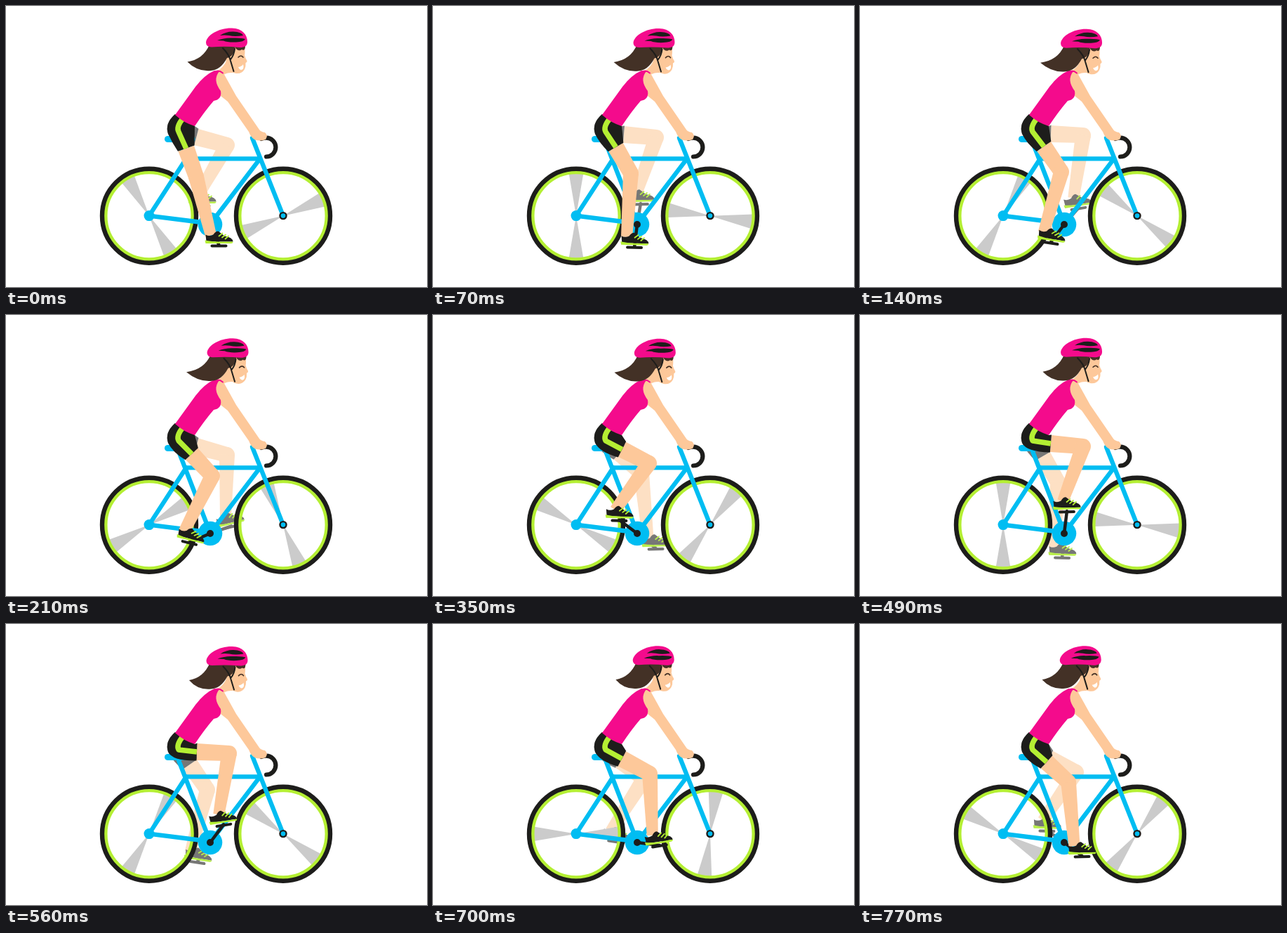
Write an HTML page with a canvas that moves like this. It is 600 px wide and 400 px high and loops after 840 ms.

```html
<!DOCTYPE html>
<html lang="en">
<head>
<meta charset="utf-8">
<title>Cyclist</title>
<style>
html, body { margin: 0; width: 100%; height: 100%; overflow: hidden; background: #fff; }
canvas { display: block; }
</style>
</head>
<body>
<canvas id="stage" width="600" height="400"></canvas>
<script>
const ctx = document.getElementById('stage').getContext('2d');
const STEP = 70, STEPS = 12, TURN = Math.PI / 6;
const BLUE = '#00bdf2', LIME = '#b4ef33', BLACK = '#1d1d1b', PINK = '#f40b8c',
      SKIN = '#fdc89a', HAIR = '#433126', GREY = '#cbcbcb';
const NEAR = { skin: SKIN, dark: BLACK, lime: LIME, shift: [0, 0] };
const FAR = { skin: '#fde0c4', dark: '#777776', lime: '#b9ee4c', shift: [1, 2] };
const HIP = [249, 181], CRANK = [291, 311];

// Knee position for each twelfth of a pedal turn
const KNEES = [
  [271, 243], [282, 238], [287, 236], [294, 229], [301, 220], [308, 211],
  [315, 198], [318, 187], [318, 184], [315, 199], [309, 213], [297, 225]
];

function fill(path, color) {
  ctx.fillStyle = color;
  ctx.fill(new Path2D(path));
}

function line(path, color, width, cap = 'round') {
  ctx.strokeStyle = color;
  ctx.lineWidth = width;
  ctx.lineCap = cap;
  ctx.lineJoin = 'round';
  ctx.stroke(new Path2D(path));
}

function disc(x, y, r, color) {
  ctx.fillStyle = color;
  ctx.beginPath();
  ctx.arc(x, y, r, 0, 2 * Math.PI);
  ctx.fill();
}

function ring(x, y, r, color, width) {
  ctx.strokeStyle = color;
  ctx.lineWidth = width;
  ctx.beginPath();
  ctx.arc(x, y, r, 0, 2 * Math.PI);
  ctx.stroke();
}

// The two edge points of a limb of the given width at p, heading along angle
function edges([x, y], angle, width) {
  const dx = Math.sin(angle) * width / 2, dy = Math.cos(angle) * width / 2;
  return [[x - dx, y + dy], [x + dx, y - dy]];
}

function limb(p, q, startWidth, endWidth, color) {
  const angle = Math.atan2(q[1] - p[1], q[0] - p[0]);
  const [a, b] = edges(p, angle, startWidth), [c, d] = edges(q, angle, endWidth);
  fill(`M${a}L${b}L${d}L${c}Z`, color);
}

function wheel(x, y, angle) {
  ctx.fillStyle = GREY;
  for (const start of [angle, angle + Math.PI]) {
    ctx.beginPath();
    ctx.moveTo(x, y);
    ctx.arc(x, y, 61, start - 0.17, start + 0.17);
    ctx.fill();
  }
  ring(x, y, 62, LIME, 5);
  ring(x, y, 67, BLACK, 6.4);
}

function pedalAt(i, [dx, dy]) {
  const angle = 67 * Math.PI / 180 + i * TURN;
  return [CRANK[0] + 32 * Math.cos(angle) + dx, CRANK[1] + 32 * Math.sin(angle) + dy];
}

function crank(i, tone) {
  line(`M${CRANK}L${pedalAt(i, tone.shift)}`, tone.dark, 4.5);
  disc(...CRANK, 5, tone.dark);
}

function leg(i, tone) {
  const pedal = pedalAt(i, tone.shift), knee = KNEES[i];
  const tilt = 0.24 * Math.cos((i - 3) * TURN) ** 3;
  const back = 8.5 + 3 * Math.cos(i * TURN);
  const ankle = [pedal[0] - back, pedal[1] - 14];
  const thigh = Math.atan2(knee[1] - HIP[1], knee[0] - HIP[0]);
  const hem = [HIP[0] + 23 * Math.cos(thigh), HIP[1] + 23 * Math.sin(thigh)];
  const [rear, front] = edges(hem, thigh, 25);

  limb(hem, knee, 24, 22, tone.skin);
  disc(...knee, 11, tone.skin);
  limb(knee, ankle, 22, 16, tone.skin);

  ctx.save();
  ctx.translate(...pedal);
  ctx.rotate(tilt);
  line('M-10 1H10', tone.dark, 4);
  fill('M-18-5L-19-15Q-14-12-8-15Q-5-20-1-20L8-13Q20-11 20-5Z', tone.dark);
  fill('M-20-7Q-10-5 0-5H20Q20-2.5 17-2.5H-19Z', tone.lime);
  line('M0-13L5-17M4.5-11L9.5-15M9-9L13.5-13', tone.lime, 1.8);
  ctx.restore();

  fill(`M241 154Q226 167 231 182Q237 195 ${rear}L${front}L269 171Z`, tone.dark);
  if (tone === NEAR) line(`M253 159Q242 172 246 179L${hem}`, LIME, 7.5, 'butt');
}

function bike() {
  line('M230.5 189.5H265', BLUE, 9);
  line('M246 194L291 310M257 217.3H362L293 308M257 217L204 298.6L291 309.5M351 188L395 298.6', BLUE, 6.3);
  disc(204, 298.6, 7.5, BLUE);
  disc(395, 298.6, 5.7, BLACK);
  disc(395, 298.6, 3.3, BLUE);
  disc(...CRANK, 17.3, BLUE);
}

function head(i) {
  const sway = Math.cos((i - 4.5) * TURN) + 0.7;
  const tip = -1 - 2 * Math.cos((i - 2.5) * TURN) - 1.1 * sway;
  ctx.save();
  ctx.translate(1.1 * sway, 1.3 * sway);
  fill('M312 56H340Q341 66 340 70Q341 74 343.5 78Q344 80 341.5 81Q342 86 340 90Q336 97 328 96Q319 95 314 84Z', SKIN);
  fill(`M290 55H327Q326 72 315 74Q306 91 292 92Q273 94 ${260 + tip} 79.5Q281 76 290 55Z`, HAIR);
  fill('M325 56H341Q341 65 336 62Q332 65 328 61Z', HAIR);
  line('M309 60Q318 69 320 78L324.5 93M326 61Q325 70 320 76', BLACK, 2);
  line('M331 73Q335 69 338 73', HAIR, 1.6);
  fill('M331 87Q336 86 338 83Q340 90 335 91Q332 90 331 87Z', '#fff');
  fill('M285 52C286 41 304 31 322 31.5C337 32 344 41 344 51C344 57 340 59 333 59Q313 57 293 58.5Q285 58 285 52Z', PINK);
  fill('M305 42Q314 36 324 36.5Q336 37 338 42Q326 44 318 42Q311 41 305 42Z', BLACK);
  fill('M301 49Q311 45 322 45.5Q337 45 341 47Q339 51 328 51.5Q316 52 310 49.5Z', BLACK);
  ctx.restore();
}

function upperBody(i) {
  fill('M317 72L312 82Q306 92 297 93L307 102Q311 94 323 95Z', SKIN);
  line('M364 189Q367 187.7 371 187.7A13.4 13.4 0 0 1 371 214.5', BLACK, 6.2);
  fill('M298 94Q308 91 313 101L328 128L361 176Q363 179 369 180Q374 184 370 190Q362 193 354 190Q349 187 346 179L316 136L301 124Z', SKIN);
  fill('M241 155L270 115Q283 98 297 92L304 93Q294 105 306 121Q308 133 296 135Q283 150 269 171Q253 166 241 155Z', PINK);
  line('M298 93.5Q304 91 309 95.5', PINK, 2);
  head(i);
}

function draw(i) {
  const spin = i * TURN, opposite = (i + 6) % STEPS;
  ctx.fillStyle = '#fff';
  ctx.fillRect(0, 0, 600, 400);
  crank(opposite, FAR);
  leg(opposite, FAR);
  wheel(204, 298.7, Math.PI / 3 + spin);
  wheel(395, 298.7, -0.39 + spin);
  bike();
  crank(i, NEAR);
  leg(i, NEAR);
  upperBody(i);
}

function tick() {
  draw(Math.floor(performance.now() / STEP) % STEPS);
  requestAnimationFrame(tick);
}
tick();
</script>
</body>
</html>
```
